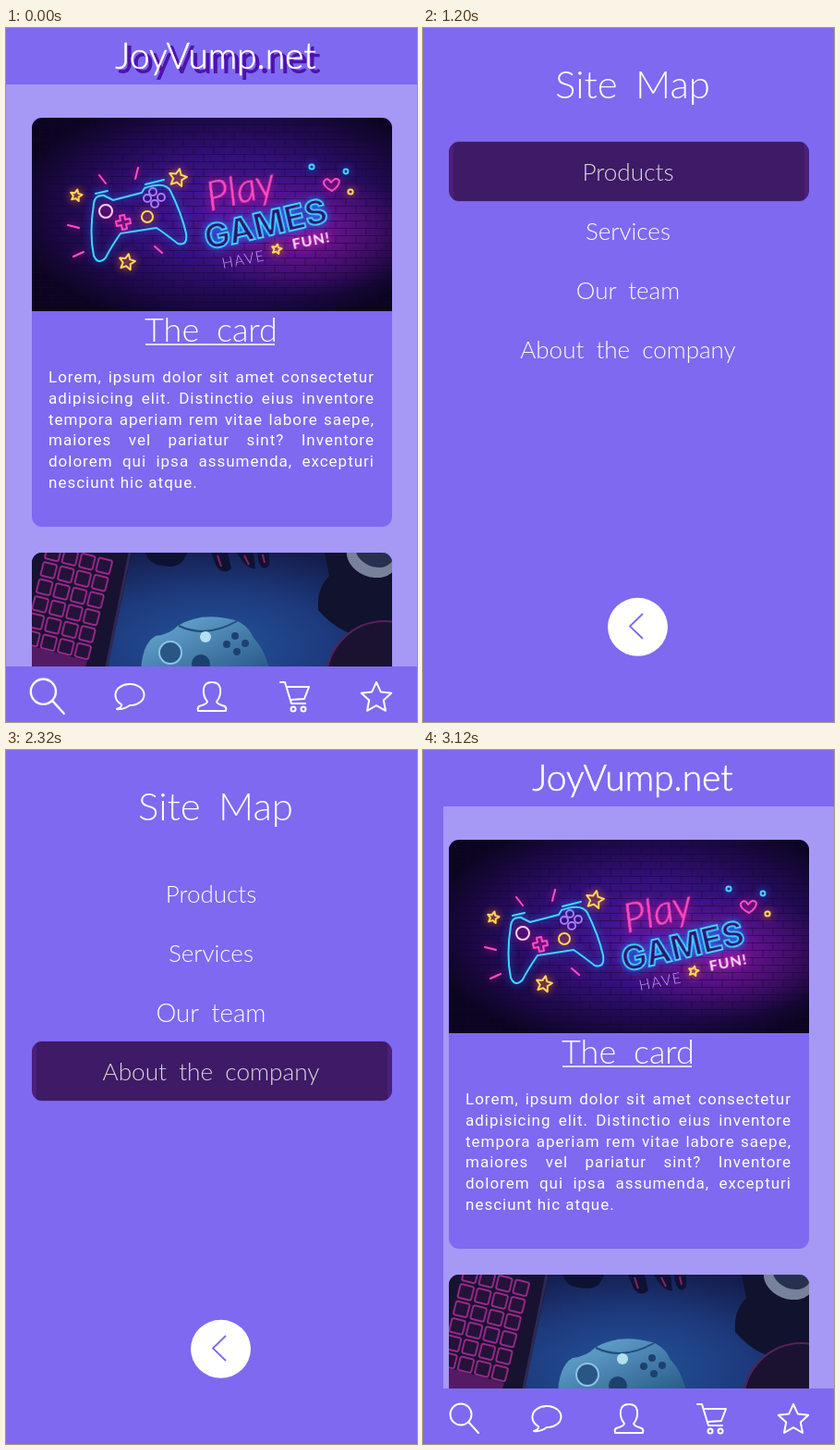
Write an HTML page that moves like this. It is 445 px wide and 750 px high and loops after 3200 ms.

```html
<!DOCTYPE html>
<html lang="en">
<head>
<meta charset="utf-8">
<title>Game shop</title>
<style>
  html, body { margin: 0; width: 100%; height: 100%; overflow: hidden; background: #a698f5; }
  .stage { position: relative; width: 445px; height: 750px; overflow: hidden; }
  svg { position: absolute; inset: 0; width: 445px; height: 750px; }
  .hand { font-family: Lato, sans-serif; font-weight: 300; fill: #fff; text-anchor: middle; }
  .title { font-size: 39px; stroke: #fff; stroke-width: .6px; }
  .shade { fill: #4f12ae; stroke: #4f12ae; stroke-width: 2px; }
  .item { font-size: 26px; word-spacing: 6px; transform-box: fill-box; transform-origin: center; }
  .copy { position: absolute; left: 46px; top: 366px; width: 353px; margin: 0; color: #fff;
    font: 400 17px/22.8px Roboto, sans-serif; letter-spacing: 1px; }
  .copy span { display: block; white-space: nowrap; text-align: justify; text-align-last: justify; }
  .copy span:last-child { text-align-last: left; }
  .icons { fill: none; stroke: #fff; stroke-width: 2; stroke-linejoin: round; stroke-linecap: round; }
  #search { transform-origin: 44.5px 722.5px; }
  .neon { fill: none; stroke-width: 2; stroke-linecap: round; stroke-linejoin: round; }
  .cyan { stroke: #45d4ff; filter: drop-shadow(0 0 4px #1677ff); }
  .pink { stroke: #ff4fc0; filter: drop-shadow(0 0 4px #e0129c); }
  .gold { stroke: #ffd95a; filter: drop-shadow(0 0 4px #ff7a1c); }
  .violet { stroke: #a77bff; }
</style>
</head>
<body>
<div class="stage">
  <svg viewBox="0 0 445 750">
    <defs>
      <radialGradient id="wall" cx=".55" cy=".48" r=".62">
        <stop offset="0" stop-color="#4c169c"/><stop offset=".45" stop-color="#33107a"/>
        <stop offset=".8" stop-color="#1a0842"/><stop offset="1" stop-color="#0c0420"/>
      </radialGradient>
      <radialGradient id="blush" cx=".76" cy=".6" r=".32">
        <stop offset="0" stop-color="#a313a8" stop-opacity=".6"/><stop offset="1" stop-color="#a313a8" stop-opacity="0"/>
      </radialGradient>
      <pattern id="bricks" width="22" height="16" patternUnits="userSpaceOnUse">
        <path d="M0 .5H22M0 8.5H22M5 0V8M16 8V16" stroke="#12052f" stroke-opacity=".5" fill="none"/>
      </pattern>
      <radialGradient id="desk" cx=".5" cy=".55" r=".6">
        <stop offset="0" stop-color="#245399"/><stop offset=".55" stop-color="#1d3a7d"/><stop offset="1" stop-color="#141c4c"/>
      </radialGradient>
      <linearGradient id="pad" x1="0" x2="1" y1="0" y2="1">
        <stop offset="0" stop-color="#6db0d8"/><stop offset="1" stop-color="#235384"/>
      </linearGradient>
      <pattern id="keys" width="19" height="19" patternUnits="userSpaceOnUse">
        <rect x="2" y="2" width="15" height="15" rx="2" fill="#241238" stroke="#c22fa8" stroke-width="1.4"/>
      </pattern>
      <clipPath id="cardA"><rect x="28" y="97" width="390" height="442" rx="11"/></clipPath>
      <clipPath id="cardB"><rect x="28" y="567" width="390" height="300" rx="11"/></clipPath>
    </defs>

    <rect width="445" height="750" fill="#a698f5"/>
    <rect width="445" height="61" fill="#7e69f0"/>
    <text id="shade" class="hand title shade" x="231" y="48">JoyVump.net</text>
    <text class="hand title" x="227" y="44">JoyVump.net</text>

    <g clip-path="url(#cardA)">
      <rect x="28" y="97" width="390" height="442" fill="#7e69f0"/>
      <rect x="28" y="97" width="390" height="209" fill="url(#wall)"/>
      <rect x="28" y="97" width="390" height="209" fill="url(#blush)"/>
      <rect x="28" y="97" width="390" height="209" fill="url(#bricks)"/>
      <g class="neon">
        <g class="cyan">
          <path d="M95 190Q96 180 106 181L116 186L147 178L150 173Q172 165 178 176Q190 200 195 222Q197 236 186 233Q172 222 163 216L124 222Q113 238 108 248Q100 257 95 246Q90 222 95 190ZM97 179l13-3M151 169l20-5"/>
          <circle cx="331" cy="150" r="2.6"/><circle cx="368" cy="155" r="2.4"/>
        </g>
        <g class="violet">
          <circle cx="153" cy="184" r="4"/><circle cx="159" cy="177" r="4"/>
          <circle cx="168" cy="183" r="4"/><circle cx="161" cy="190" r="4"/>
        </g>
        <g class="pink">
          <path d="M123 203l5-1 1 5 5-1 1 5-5 1 1 5-5 1-1-5-5 1-1-5 5-1Z"/>
          <path d="M101 159l7 9M143 151l-3 12M67 213l12 3M84 242l-11 5M161 236l8 7"/>
          <path d="M353 176Q343 171 344 166Q348 160 352 167Q357 160 361 165Q361 171 353 176Z"/>
          <circle cx="108" cy="198" r="7" stroke="#ffd0f0"/>
        </g>
        <g class="gold" id="stars">
          <circle cx="153" cy="204" r="6"/><circle cx="373" cy="177" r="2.6"/>
        </g>
      </g>
      <text class="pink" transform="translate(221 198) rotate(-14)" fill="#ff4fc0" stroke-width=".6"
        style="font:italic 300 44px Lato, sans-serif">Play</text>
      <text class="cyan" transform="translate(218 240) rotate(-13)" fill="#2b1470" stroke-width="1.8"
        style="font:700 37px Inter, sans-serif">GAMES</text>
      <text transform="translate(235 260) rotate(-11)" fill="#c3a2ff"
        style="font:300 16px Lato, sans-serif;letter-spacing:1.5px">HAVE</text>
      <text transform="translate(311 239) rotate(-11)" fill="#ffe3fb"
        style="font:700 16px Lato, sans-serif;letter-spacing:1px;filter:drop-shadow(0 0 4px #ff2cc8)">FUN!</text>
      <text class="hand" x="222" y="339" style="font-size:36px;word-spacing:9px">The card</text>
      <path d="M151 342H291" stroke="#fff" stroke-width="1.6"/>
    </g>

    <g clip-path="url(#cardB)">
      <rect x="28" y="567" width="390" height="183" fill="url(#desk)"/>
      <path d="M28 567H136L110 690H28Z" fill="#17122f"/>
      <path d="M134 567L109 690" stroke="#2c2a55" stroke-width="3"/>
      <g transform="translate(44 556) rotate(14)"><rect width="76" height="114" fill="url(#keys)"/></g>
      <path d="M28 668L88 684L86 690H28Z" fill="#541a63"/>
      <path d="M151 567H196Q190 586 170 581Q155 580 151 567ZM222 567H240L244 584Q236 592 228 582ZM250 567H268L270 584Q261 586 250 567ZM272 567H285V580Q279 588 274 578Z" fill="#0e1232"/>
      <path d="M229 570l4 12M258 570l5 10M278 569l2 9" stroke="#8d1d5e" stroke-width="2"/>
      <path d="M345 567H418V656Q372 668 338 629Q336 606 350 592Z" fill="#11122d"/>
      <ellipse cx="396" cy="572" rx="28" ry="21" fill="#77829a" transform="rotate(22 396 572)"/>
      <ellipse cx="399" cy="567" rx="21" ry="15" fill="#27304f" transform="rotate(22 399 567)"/>
      <circle cx="410" cy="704" r="63" fill="#1b1231" stroke="#57205d" stroke-width="2"/>
      <path d="M146 700Q146 666 162 657Q178 655 186 646Q212 630 248 640Q262 645 268 659Q281 672 287 700Z" fill="url(#pad)"/>
      <path d="M187 646Q216 660 250 641" fill="none" stroke="#214c7b" stroke-width="2"/>
      <circle cx="178" cy="675" r="12" fill="#2a5685" stroke="#8ac6e6" stroke-width="2"/>
      <circle cx="216" cy="658" r="6" fill="#b4dff0"/>
      <g fill="#1d416e">
        <circle cx="248" cy="657" r="4"/><circle cx="239" cy="666" r="4"/>
        <circle cx="259" cy="665" r="4"/><circle cx="250" cy="674" r="4"/><circle cx="211" cy="687" r="10"/>
      </g>
    </g>

    <rect y="690" width="445" height="60" fill="#7e69f0"/>
    <g class="icons" id="icons">
      <g id="search"><circle cx="41" cy="718" r="11.5"/><path d="M49.5 726.5L60 738"/></g>
      <path d="M120 736Q126 734 125 731Q118 727 118.500 720A15.500 11.500 0 1 1 134 732Q127 737 120 736Z"/>
      <path d="M218 728Q213 722 214 714Q215 707 223 707Q231 707 232 714Q233 722 228 728Q229 731 237 733Q239 735 238 738H208Q207 735 209 733Q217 731 218 728Z"/>
      <path d="M297 707H302L309 730H324M304 712H328L323 725L308 726"/>
      <circle cx="311" cy="736" r="2.5"/><circle cx="322" cy="736" r="2.5"/>
    </g>
  </svg>

  <p class="copy">
    <span>Lorem, ipsum dolor sit amet consectetur</span>
    <span>adipisicing elit. Distinctio eius inventore</span>
    <span>tempora aperiam rem vitae labore saepe,</span>
    <span>maiores vel pariatur sint? Inventore</span>
    <span>dolorem qui ipsa assumenda, excepturi</span>
    <span>nesciunt hic atque.</span>
  </p>

  <svg id="menu" viewBox="0 0 445 750">
    <rect width="445" height="750" fill="#7e69f0"/>
    <text class="hand" x="227" y="76" style="font-size:42px;word-spacing:8px">Site Map</text>
    <g id="items"></g>
    <ellipse cx="232.5" cy="647.3" rx="32.500" ry="31.500" fill="#fff"/>
    <path d="M238 633L224 646.500L238 660" fill="none" stroke="#7e69f0" stroke-width="1.8"/>
  </svg>
</div>

<script>
const LOOP = 3200, STEP = 80, TOLERANCE = 10;
const byId = id => document.getElementById(id);
const tracks = [];

function add(parent, tag, attrs, text = '') {
  const el = document.createElementNS('http://www.w3.org/2000/svg', tag);
  for (const name in attrs) el.setAttribute(name, attrs[name]);
  el.textContent = text;
  return parent.appendChild(el);
}

function register(anim) {
  anim.pause();
  tracks.push(anim);
}

// rows: [time, value, easing until the next row]
function track(el, prop, rows) {
  const last = rows[rows.length - 1];
  const keys = [...rows, [LOOP, last[1]]].map(([time, value, easing = 'linear']) =>
    ({ offset: time / LOOP, [prop]: value, easing }));
  register(el.animate(keys, { duration: LOOP, iterations: Infinity }));
}

function showBetween(el, from, to) {
  track(el, 'opacity', [[0, 0, 'step-end'], [from, 1, 'step-end'], [to, 0]]);
}

function slide(el, from, to, delay) {
  register(el.animate({ transform: [from, to] }, { delay, duration: 400, easing: 'ease', fill: 'forwards' }));
}

function star(parent, x, y, r, tilt = 0) {
  const points = Array.from({ length: 10 }, (_, i) => {
    const a = tilt + (i * 36 - 90) * Math.PI / 180, d = i % 2 ? r * .48 : r;
    return [x + d * Math.cos(a), y + d * Math.sin(a)].map(v => v.toFixed(1)).join();
  });
  add(parent, 'polygon', { points: points.join(' ') });
}

star(byId('icons'), 401, 724, 17);
for (const s of [[186, 162, 10], [76, 181, 6.5], [131, 253, 9], [293, 239, 5.5]]) star(byId('stars'), ...s, .2);

const items = [
  ['Products', 1180, 1540],
  ['Services', 1540, 1920],
  ['Our team', 1920, 2280],
  ['About the company', 2300, 2780]
];
items.forEach(([label, from, to], i) => {
  const group = byId('items'), y = 123 + i * 64;
  const back = add(group, 'rect', { x: 28, y, width: 390, height: 64, rx: 11, fill: '#4b1f7a' });
  const text = add(group, 'text', { class: 'hand item', x: 222, y: y + 42 }, label);
  const tap = add(group, 'rect', { x: 33, y: y - .5, width: 380, height: 65, rx: 4, fill: '#000', 'fill-opacity': .15 });
  showBetween(back, from, to);
  showBetween(tap, from, from + 60);
  track(text, 'transform', [
    [0, 'scale(1)'], [from, 'scale(1)', 'ease'], [from + 200, 'scale(1.075)'],
    [to, 'scale(1.075)', 'ease'], [to + 260, 'scale(1)']
  ]);
});

const away = 'translateX(-445px)', home = 'translateX(0px)';
slide(byId('menu'), away, home, 0);
slide(byId('menu'), home, away, 2830);
track(byId('shade'), 'opacity', [[0, 1, 'step-end'], [400, 0]]);
track(byId('search'), 'transform', [[0, 'scale(1.18)', 'step-end'], [400, 'scale(1)']]);

const start = performance.now();
function draw(now) {
  const elapsed = Math.max(0, now - start) + TOLERANCE;
  const time = Math.floor(elapsed / STEP) * STEP % LOOP;
  for (const anim of tracks) anim.currentTime = time;
  requestAnimationFrame(draw);
}
draw(start);
</script>
</body>
</html>
```
